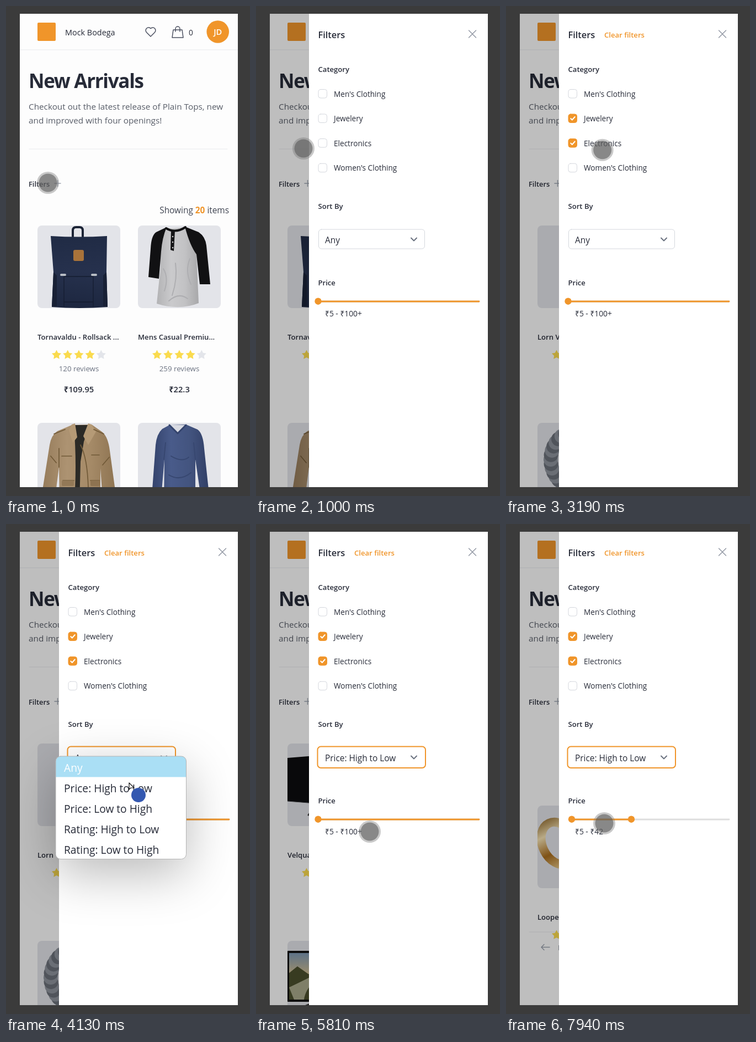
Write an HTML page with a canvas that moves like this. It is 442 by 884 pixels and loops after 8 s.

```html
<!DOCTYPE html>
<html lang="en">
<head>
<meta charset="utf-8">
<title>Shop filters</title>
<style>
html, body { margin: 0; width: 100%; height: 100%; overflow: hidden; background: #3b3b3b; }
canvas { display: block; width: 442px; height: 884px; }
</style>
</head>
<body>
<canvas id="stage"></canvas>
<script>
const LOOP = 8000;
const ORANGE = '#f0952a', INK = '#272b38', GRAY = '#6b7280', RULE = '#e8eaed';
const canvas = document.getElementById('stage');
const ctx = canvas.getContext('2d');
const ratio = window.devicePixelRatio || 1;
canvas.width = 442 * ratio;
canvas.height = 884 * ratio;

// Timing of the interactions, in ms
const OPEN = 110, PICK_JEWELRY = 1950, PICK_ELECTRONICS = 2950;
const MENU_OPEN = 3780, MENU_CLOSE = 4580, DRAG = 6480, DROP = 7080;

const clamp01 = v => Math.min(1, Math.max(0, v));
const smooth = v => { v = clamp01(v); return v * v * (3 - 2 * v); };
const progress = (t, start, length) => smooth((t - start) / length);

function text(str, x, y, size, { weight = 400, color = INK, align = 'left', spacing = 0 } = {}) {
  ctx.font = `${weight} ${size}px "Open Sans", "Noto Sans", sans-serif`;
  ctx.letterSpacing = spacing + 'px';
  ctx.textAlign = align;
  ctx.fillStyle = color;
  ctx.fillText(str, x, y);
  return ctx.measureText(str).width;
}
const bold = (str, x, y, size = 13.1, color = INK) => text(str, x, y, size, { weight: 600, color });

function box(x, y, w, h, r, fill, stroke, lineWidth = 1) {
  ctx.beginPath();
  ctx.roundRect(x, y, w, h, r);
  if (fill) { ctx.fillStyle = fill; ctx.fill(); }
  if (stroke) { ctx.strokeStyle = stroke; ctx.lineWidth = lineWidth; ctx.stroke(); }
}
function disc(x, y, r, fill) {
  ctx.beginPath();
  ctx.arc(x, y, r, 0, 7);
  ctx.fillStyle = fill;
  ctx.fill();
}
function shape(d, fill) {
  ctx.fillStyle = fill;
  ctx.fill(new Path2D(d));
}
function line(d, color, width = 1.5) {
  ctx.strokeStyle = color;
  ctx.lineWidth = width;
  ctx.lineCap = ctx.lineJoin = 'round';
  ctx.stroke(new Path2D(d));
}
function at(x, y, draw) {
  ctx.save();
  ctx.translate(x, y);
  draw();
  ctx.restore();
}
// Evenly spaced colours from one point to another
function blend(x0, y0, x1, y1, ...colors) {
  const g = ctx.createLinearGradient(x0, y0, x1, y1);
  colors.forEach((c, i) => g.addColorStop(i / (colors.length - 1), c));
  return g;
}

// Product pictures, each in a 150 x 150 square
function backpack() {
  line('M64 20V9Q64 3 70 3H76Q82 3 82 9V20', '#1b2335', 4);
  shape('M24 19Q75 22 126 19L125 84L127 147Q75 151 26 147L29 84Z', blend(0, 19, 0, 148, '#202b45', '#26314d', '#1d2740'));
  shape('M29 84L35 90V146L26 147ZM125 84L119 90V146L127 147Z', '#182035');
  line('M48 92H101V138H48ZM48 92V146M101 92V146', '#151d30', 1.3);
  line('M43 89H50M99 89H106', '#b9bec5', 4);
  box(65, 44, 19, 20, 3, '#a9733a');
}
function henley() {
  shape('M49 6L87 3L106 50L110 140Q75 154 34 141L41 75L40 46Z', blend(36, 0, 110, 0, '#b4b4b6', '#cacacc', '#c2c2c4', '#a8a8aa'));
  shape('M52 3L33 12Q24 18 23 42L19 93L38 96L42 47Q44 22 52 3ZM85 2L110 12Q122 20 124 36L131 106L112 106L106 52Q94 36 85 2Z', '#111113');
  line('M51 5Q68 15 86 3', '#111113', 4);
  shape('M60 9H67L65 46L59 44Z', '#141416');
  line('M68 68Q72 96 62 126M94 60Q85 82 96 106M46 78Q56 94 48 118M56 136Q74 120 90 132', '#aeaeb1', 2);
  for (const y of [20, 30, 40]) disc(63, y, 1.2, '#ddd');
}
function jacket() {
  shape('M62 4L98 3L118 17Q128 26 131 50L142 130L118 138L114 82V150H40L39 80L32 134L9 122L22 40Q25 22 36 15Z', blend(10, 0, 140, 0, '#967c5b', '#ad9372', '#a58a67', '#8f7553'));
  shape('M66 4H94L84 34L78 70L76 150H66Q72 80 66 4Z', '#2b2a26');
  shape('M62 3L68 1L72 26L64 36L57 14ZM98 3L92 1L83 24L92 40L106 16Z', '#b59a76');
  line('M78 40Q94 70 92 150M44 60H62M98 58H112M46 104H66M96 104H112M39 46V80M30 20L50 12M102 12L120 20M24 60L34 72M130 62L118 76', '#705937', 1.7);
  box(44, 104, 22, 10, 2, '#937957');
  box(96, 104, 17, 10, 2, '#8d7351');
}
function blueShirt() {
  shape('M57 4L87 3L108 12Q118 19 120 46L129 130L114 134L104 66V150H47L48 66L43 124L26 120L32 40Q34 20 44 11Z', blend(26, 0, 128, 0, '#34436c', '#495b8a', '#43547f', '#313f66'));
  shape('M58 4L72 18L86 4Z', '#d9dbe2');
  line('M57 4L72 19L87 4', '#33436c', 3);
  line('M60 60Q80 72 92 62M56 94Q76 106 96 90M54 120Q80 128 98 116M47 66L50 36M104 66L101 36', '#374770', 2);
}
function bracelet() {
  for (let i = 0; i < 40; i++) {
    const a = i * Math.PI / 20;
    disc(72 + 48 * Math.cos(a), 66 + 52 * Math.sin(a), 13, i % 2 ? '#6b7079' : '#8d939c');
  }
}
function chain() {
  ctx.beginPath();
  ctx.ellipse(82, 78, 40, 54, 0, 0, 7);
  ctx.strokeStyle = '#b3b6bc';
  ctx.lineWidth = 6;
  ctx.stroke();
}
function monitor() {
  shape('M0 26L150 14V116L0 104Z', '#0c0c0e');
  line('M0 104L150 116', '#45464a', 1);
  line('M50 112L38 129M104 116L116 129', '#333', 3);
}
function television() {
  box(0, 18, 150, 92, 1, '#111');
  ctx.fillStyle = blend(0, 22, 0, 106, '#7d98b4', '#d8c08c', '#43532c');
  ctx.fillRect(3, 22, 144, 84);
  shape('M3 58L18 46L38 60L60 46L147 70V106H3Z', '#4a4e2c');
  shape('M3 84Q24 74 40 66L50 72Q32 88 30 106H12Z', '#a9a98b');
  shape('M48 110H58L48 116H32Z', '#222');
}
function goldRings() {
  ctx.strokeStyle = blend(0, 25, 45, 115, '#8d6526', '#f6e3b4', '#a96d1c', '#ecd093');
  ctx.lineWidth = 16;
  for (const [x, y] of [[38, 68], [106, 84]]) {
    ctx.beginPath();
    ctx.ellipse(x, y, 29, 40, -0.45, 0, 7);
    ctx.stroke();
  }
}

const product = (name, reviews, price, draw, rating = 4) => ({ name, reviews, price, draw, rating });
const catalog = [
  product('Tornavaldu - Rollsack ...', 120, '109.95', backpack),
  product('Mens Casual Premiu...', 259, '22.3', henley),
  product('Mens Cotton Jacket', 500, '55.99', jacket),
  product('Mens Casual Slim Fit', 430, '15.99', blueShirt)
];
const jewelry = [product('Lorn Vesker Women...', 400, '695', chain), null,
  product('Plated Band', 100, '9.99', bracelet)];
const byPrice = [product('Velqua 49-Inch Curv...', 140, '999.99', monitor), null,
  product('Wide Screen', 250, '599', television)];
const cheap = [product('Looped Elk Rose Go...', 100, '10.99', goldRings)];

function star(x, y, filled) {
  ctx.beginPath();
  for (let i = 0; i < 10; i++) {
    const r = i % 2 ? 4.6 : 9, a = i * Math.PI / 5 - Math.PI / 2;
    ctx.lineTo(x + r * Math.cos(a), y + r * Math.sin(a));
  }
  ctx.closePath();
  ctx.fillStyle = filled ? '#fadb4e' : '#e3e5ea';
  ctx.fill();
}

function card(item, x, y) {
  at(x, y, () => {
    ctx.save();
    box(0, 0, 150, 149, 8, '#e3e4e9');
    ctx.clip();
    item.draw();
    ctx.restore();
    bold(item.name, 0, 206);
    for (let i = 0; i < 5; i++) star(34.5 + i * 20.2, 233.5, i < item.rating);
    text(item.reviews + ' reviews', 75, 263, 13.3, { color: GRAY, align: 'center' });
    text('₹' + item.price, 75, 301, 14.7, { weight: 600, align: 'center' });
  });
}

function products(t) {
  let items = catalog, shift = 0;
  if (t >= 7680) {
    items = cheap;
    shift = 472 * (1 - progress(t, 7680, 382));
    line('M42 736H401', RULE, 1);
    line('M79 763.5H64M69 758.5L64 763.5L69 768.5', '#9ca3af');
    text('Previous', 94, 769, 13.5, { color: GRAY });
  } else if (t >= 7300) {
    return;
  } else if (t >= MENU_CLOSE + 60) {
    items = byPrice;
    shift = 480 * (1 - progress(t, 4900, 380));
  } else if (t >= PICK_JEWELRY + 60) {
    items = jewelry;
    shift = 480 * (1 - progress(t, 2440, 360));
  }
  items.forEach((item, i) => item && card(item, 57 + 182 * (i % 2), 396 + 356 * (i >> 1) + shift));
}

function page(t) {
  ctx.fillStyle = '#fdfdfd';
  ctx.fillRect(25, 14, 395, 854);
  box(57, 30, 33, 33, 2, ORANGE);
  text('Mock Bodega', 107, 53, 14.4);
  line('M262 55L254.5 47.5A5 5 0 0 1 262 40.5A5 5 0 0 1 269.5 47.5Z', '#4b5060');
  line('M303 43H319L321 57H301ZM307 46V41A4 4 0 0 1 315 41V46', '#4b5060');
  text('0', 331, 53, 13.6);
  disc(383.7, 46.5, 20.3, ORANGE);
  text('JD', 383.7, 52, 14.6, { weight: 600, color: '#fff', align: 'center' });
  line('M25 79H420', RULE, 1);

  text('New Arrivals', 41, 148, 35, { weight: 700, spacing: -1.3 });
  text('Checkout out the latest release of Plain Tops, new', 41, 187, 15.3, { color: '#585d68' });
  text('and improved with four openings!', 41, 212, 15.3, { color: '#585d68' });
  line('M42 258H401', RULE, 1);
  bold('Filters', 41, 325.5, 12.9);
  line('M88 320H99M93.5 314.5V325.5', '#9ca3af');

  const style = { align: 'right', color: '#3f4451' };
  let x = 404;
  x -= text(' items', x, 374, 15.4, style);
  x -= text('20', x, 374, 15.4, { align: 'right', color: ORANGE, weight: 700 });
  text('Showing ', x, 374, 15.4, style);
  products(t);
}

function checkbox(label, y, checked) {
  box(113, y - 7.5, 15.5, 15.5, 4, checked ? ORANGE : '#fff', checked ? ORANGE : '#d4d7dd');
  if (checked) line(`M117.3 ${y + 0.5}L119.8 ${y + 3}L124.7 ${y - 2.5}`, '#fff', 2);
  text(label, 141, y + 5.7, 13.6);
}

function slider(t) {
  const end = t < DRAG ? 404 : 404 - 177 * progress(t, DRAG, DROP - DRAG);
  const moved = end < 403.5;
  const start = moved ? 119 : 112.5;
  line('M114 533H404', '#dedede', 2.8);
  line(`M${start} 533H${end}`, ORANGE, 2.8);
  disc(start, 532.7, 6.2, ORANGE);
  if (moved) disc(end, 532.7, 6.2, ORANGE);
  const max = Math.round(5 + (end - 119) / 2.92);
  text('₹5 - ₹' + (max >= 100 ? '100+' : max), 125, 560, 13.8);
}

function drawer(t) {
  ctx.fillStyle = '#fff';
  ctx.fillRect(96, 14, 324, 854);
  bold('Filters', 112.5, 57.5, 16.4);
  if (t >= PICK_JEWELRY) bold('Clear filters', 178, 57, 13.1, ORANGE);
  line('M385.5 44L398.5 57M398.5 44L385.5 57', '#8f95a1', 1.4);

  bold('Category', 112.5, 119);
  checkbox("Men's Clothing", 158, false);
  checkbox('Jewelery', 202.5, t >= PICK_JEWELRY);
  checkbox('Electronics', 247, t >= PICK_ELECTRONICS);
  checkbox("Women's Clothing", 291.7, false);

  bold('Sort By', 112.5, 365.5);
  if (t < MENU_OPEN) box(113.5, 403, 192, 35, 5, '#fff', '#d4d7dd');
  else box(111.5, 401.5, 195.5, 38.5, 6, '#fff', ORANGE, 2);
  text(t < MENU_CLOSE ? 'Any' : 'Price: High to Low', 125, 427.5, 15.4);
  line('M281 418.5L286 423.5L291 418.5', '#6b7280', 2);
  bold('Price', 112.5, 503.5);
  slider(t);
}

function menu(t) {
  const selected = t < 4250 ? 0 : 1;
  ctx.save();
  ctx.shadowColor = 'rgba(0,0,0,.28)';
  ctx.shadowBlur = 90 * ratio;
  ctx.shadowOffsetY = 26 * ratio;
  box(90, 419, 236.5, 185.5, 9, '#fff');
  ctx.restore();
  ctx.save();
  box(90, 419, 236.5, 185.5, 9, '#fff');
  ctx.clip();
  ctx.fillStyle = '#aadff5';
  ctx.fillRect(90, 419 + selected * 37, 237, 37.5);
  ctx.restore();
  box(90, 419, 236.5, 185.5, 9, null, '#b4b4b4');
  ['Any', 'Price: High to Low', 'Price: Low to High', 'Rating: High to Low', 'Rating: Low to High']
    .forEach((label, i) => text(label, 105, 446.5 + i * 37, 19.2, { color: i === selected ? '#fff' : INK }));
}

// Pointer stops: time, x, y
const stops = [
  [0, 76, 319], [480, 76, 318], [1000, 86, 257], [1650, 172, 208], [2000, 175, 206], [2250, 175, 214],
  [2850, 172, 247], [3100, 172, 249], [3700, 215, 422], [3850, 215, 424], [4130, 223, 467], [4300, 224, 476],
  [4600, 225, 478], [4950, 225, 482], [5700, 206, 554], [5810, 206, 555], [6350, 395, 535],
  [DRAG, 395, 535], [DROP, 218, 535], [7350, 218, 535], [7900, 178, 540], [LOOP, 178, 540]
];

function pointer(t) {
  const i = stops.findIndex((s, n) => n && s[0] >= t);
  const [t0, x0, y0] = stops[i - 1], [t1, x1, y1] = stops[i];
  const k = progress(t, t0, t1 - t0);
  const x = x0 + (x1 - x0) * k, y = y0 + (y1 - y0) * k;
  if (t >= MENU_OPEN && t < MENU_CLOSE) {
    disc(x + 17, y + 22, 13, '#3458b0');
    at(x, y, () => {
      shape('M0 0V12L3 9H9Z', '#fff');
      line('M0 0V12L3 9H9Z', '#111', 1.2);
    });
  } else {
    disc(x, y, 20, 'rgba(120,120,120,.4)');
    disc(x, y, 16.5, 'rgba(85,85,85,.55)');
  }
}

function draw(t) {
  ctx.setTransform(ratio, 0, 0, ratio, 0, 0);
  ctx.fillStyle = '#3b3b3b';
  ctx.fillRect(0, 0, 442, 884);
  ctx.save();
  ctx.beginPath();
  ctx.rect(25, 14, 395, 854);
  ctx.clip();
  page(t);
  const open = progress(t, OPEN, 380);
  ctx.fillStyle = `rgba(0,0,0,${0.25 * open})`;
  ctx.fillRect(25, 14, 395, 854);
  if (open > 0) at(324 * (1 - open), 0, () => drawer(t));
  if (t >= MENU_OPEN && t < MENU_CLOSE) menu(t);
  pointer(t);
  ctx.restore();
}

const began = performance.now();
function tick() {
  draw((performance.now() - began) % LOOP);
  requestAnimationFrame(tick);
}
tick();
</script>
</body>
</html>
```
